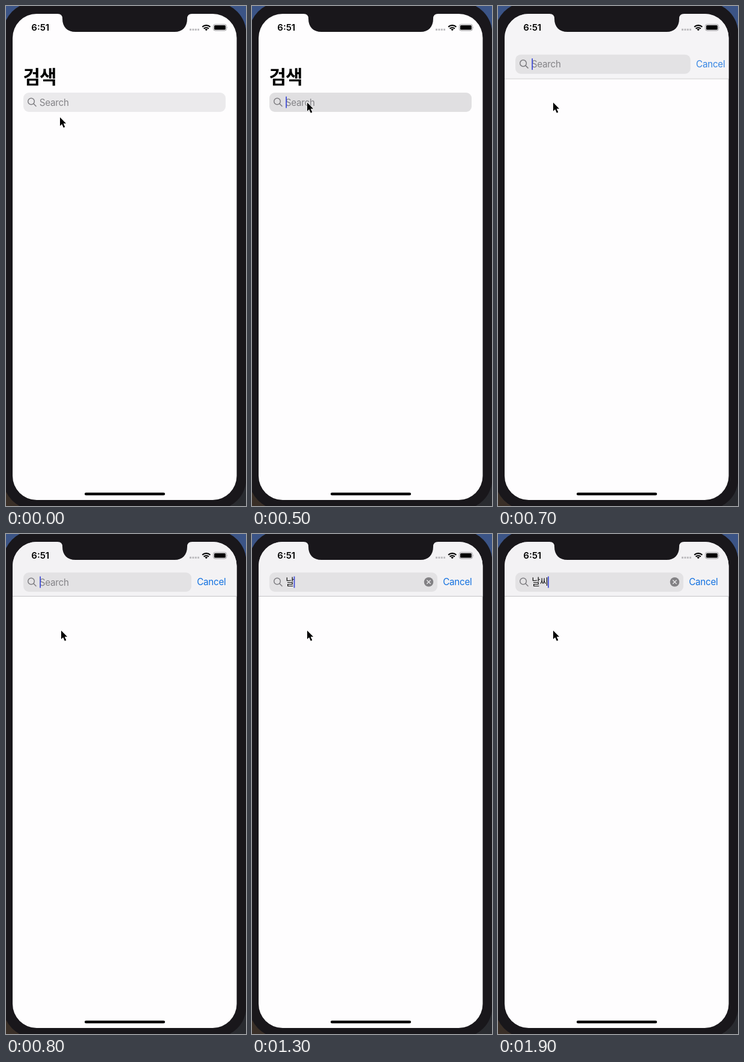
Write an HTML page that moves like this. It is 400 by 831 pixels and loops after 2 s.

```html
<!DOCTYPE html>
<html lang="ko">
<head>
<meta charset="utf-8">
<style>
  html, body { margin: 0; width: 100%; height: 100%; overflow: hidden; background: #19171b; }
  svg { display: block; width: 400px; height: 831px; }
  text { font: 15.2px Inter, "Noto Sans CJK KR", "Noto Sans CJK", sans-serif; letter-spacing: -.25px; }
  #title, #typed { font-family: "Noto Sans CJK KR", "Noto Sans CJK", sans-serif; }
  #title { font-size: 31px; font-weight: 700; letter-spacing: -1px; }
  #typed { font-size: 15.4px; letter-spacing: -.7px; }
  #clock { font-size: 15px; font-weight: 600; letter-spacing: 0; }
</style>
</head>
<body>
<svg viewBox="0 0 400 831">
  <defs>
    <linearGradient id="floor"><stop stop-color="#3a2f27"/><stop offset="1" stop-color="#292b30"/></linearGradient>
    <clipPath id="glass"><rect x="11" y="13" width="373.5" height="808" rx="40"/></clipPath>
  </defs>

  <!-- desktop and phone body -->
  <rect width="400" height="415" fill="#3b5486"/>
  <rect y="415" width="400" height="416" fill="url(#floor)"/>
  <rect x="-5" y="-6" width="405.5" height="843" rx="52" fill="#19171b"/>

  <g clip-path="url(#glass)">
    <rect width="400" height="831" fill="#fefdfe"/>
    <g id="nav">
      <rect y="-100" width="400" height="288" fill="#f3f2f4"/>
      <rect y="187.5" width="400" height="1" fill="#c4c3c6"/>
    </g>
    <text id="title" x="28.5" y="128.5">검색</text>
    <g id="search">
      <rect id="field" x="29" y="144" width="337" height="32" rx="9"/>
      <g fill="none" stroke="#7d7c80" stroke-width="1.5" stroke-linecap="round">
        <circle cx="42" cy="158.5" r="5.3"/>
        <path d="M46 162.5l4 4"/>
      </g>
      <text id="hint" x="55.8" y="165.5" fill="#838286">Search</text>
      <text id="typed" x="56.3" y="165.2" fill="#111"></text>
      <rect id="caret" y="150.5" width="1.8" height="19" fill="#4450d8"/>
      <g id="clear">
        <circle cx="294.5" cy="159.7" r="7.8" fill="#828184"/>
        <path d="M291.7 156.9l5.6 5.6m0-5.6l-5.6 5.6" stroke="#e8e7e9" stroke-width="1.4" stroke-linecap="round"/>
      </g>
      <text id="cancel" y="165" fill="#1170e0">Cancel</text>
    </g>
  </g>

  <!-- notch, status bar, home indicator -->
  <path d="M86 12V13q8 0 8 8C94 35 102 43 116 43H281C294 43 302 35 302 21q0-8 8-8V12z" fill="#19171b"/>
  <text id="clock" x="42.3" y="41">6:51</text>
  <path d="M307 39.2h16" stroke="#bab9bc" stroke-width="3" stroke-dasharray="3 1.4" transform="translate(-1)"/>
  <g fill="none" stroke="#000" stroke-width="2.2">
    <path d="M327.2 34.8a9.6 9.6 0 0 1 13.2 0M329.7 37.6a6 6 0 0 1 8.2 0"/>
    <path d="M333.8 41.2l-2.2-2.3a3.2 3.2 0 0 1 4.4 0z" fill="#000" stroke="none"/>
  </g>
  <rect x="345.5" y="30.5" width="22" height="10.5" rx="3" fill="none" stroke="#9b9a9d"/>
  <rect x="347" y="32" width="19" height="7.5" rx="1.6"/>
  <path d="M368.6 34.2q1.3 1.5 0 3.2z" fill="#9b9a9d"/>
  <rect x="131" y="808.7" width="134" height="4.6" rx="2.3"/>

  <path id="pointer" d="M0 0V14.2L3.2 11.2L5.9 17.2L8.3 16.1L5.7 10.3H10.1Z" stroke="#fff" stroke-width="1.1" paint-order="stroke"/>
</svg>
<script>
const $ = id => document.getElementById(id);
const set = (id, attrs) => {
  for (const k in attrs) $(id).setAttribute(k, attrs[k]);
};
const LOOP = 2000, STEP = 100;
const typing = [[1000, "ㄴ"], [1100, "나"], [1300, "날"], [1500, "날ㅆ"], [1600, "날씨"]];
const path = [[90, 185], [91, 172], [92, 160.5]];

function draw(t) {
  // the search bar slides up with an ease in and out
  const u = Math.min(1, Math.max(0, (t - 503) / 282));
  const p = (1 - Math.cos(Math.PI * u)) / 2;
  const active = t >= 500;
  const word = typing.reduce((w, [at, s]) => t >= at ? s : w, "");

  set("nav", { transform: `translate(0 ${-84.5 * p})`, opacity: p });
  set("title", { transform: `translate(0 ${-84.5 * p})`, opacity: Math.max(0, 1 - 2.7 * p) });
  set("search", { transform: `translate(0 ${-80 * p})` });
  set("field", { width: 337 - 57 * p, fill: !active ? "#ebeaec" : p ? "#e3e2e4" : "#e0dfe1" });
  set("cancel", { x: 375.2 - 57 * p, opacity: p ** .75 });
  set("hint", { opacity: word ? 0 : 1 });
  set("clear", { opacity: word ? 1 : 0 });
  set("caret", { x: 56.2 + 13.4 * word.length, opacity: active ? 1 : 0 });
  $("typed").textContent = word;
  set("pointer", { transform: `translate(${path[Math.min(2, t / STEP)]})` });
}

// the picture advances ten times a second
function tick() {
  draw(Math.floor(performance.now() % LOOP / STEP) * STEP);
  requestAnimationFrame(tick);
}
tick();
</script>
</body>
</html>
```
